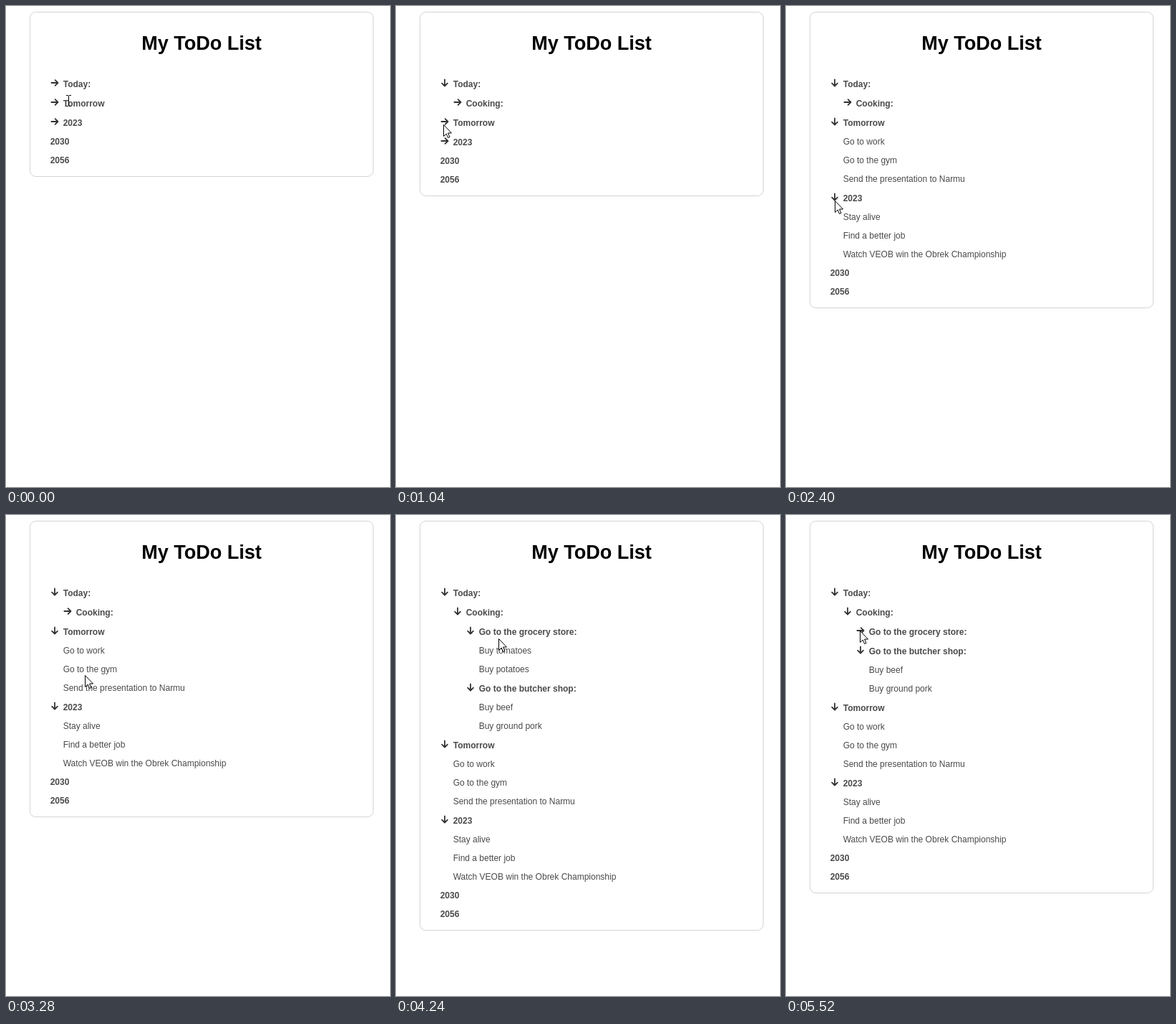
Write an HTML page that moves like this. It is 536 px wide and 670 px high and loops after 5.68 s.

```html
<!DOCTYPE html>
<html lang="en">
<head>
<meta charset="utf-8">
<title>My ToDo List</title>
<style>
  html, body { margin: 0; width: 100%; height: 100%; overflow: hidden; background: #fff; }
  svg { display: block; width: 536px; height: 670px; font-family: Arial, "Liberation Sans", sans-serif; }
  .title { font-size: 27px; font-weight: bold; text-anchor: middle; }
  .row { font-size: 12px; fill: #4a4a4a; }
  .bold { font-weight: bold; }
  .arrow { fill: none; stroke: #333; stroke-width: 1.8; stroke-linecap: round; stroke-linejoin: round; }
</style>
</head>
<body>
<svg id="stage" viewBox="0 0 536 670">
  <rect id="card" x="33.5" y="8.5" width="479" rx="8" fill="#fff" stroke="#d3d3d3"/>
  <text class="title" x="273" y="61">My ToDo List</text>
  <g id="list"></g>
  <path id="beam" d="M84 124.5h3m1 0h3M87.5 125v14M84 139.5h3m1 0h3" fill="none" stroke="#000"/>
  <path id="pointer" d="M.5 .5V16.5L4.2 13L6.6 18.5L9 17.5L6.6 12H11.5Z" fill="#fff" stroke="#000"/>
</svg>
<script>
const LOOP = 5680, TICK = 80;
const LEFT = 61.7, INDENT = 18, TOP = 86;

// A folder has open and close times; its kids are nested rows.
const folder = (text, open, kids, close = LOOP) => ({ text, open, close, kids, bold: true });
const leaf = (text, bold = false) => ({ text, bold });
const leaves = (...texts) => texts.map(text => leaf(text));

const tree = [
  folder("Today:", 480, [
    folder("Cooking:", 3760, [
      folder("Go to the grocery store:", 0, leaves("Buy tomatoes", "Buy potatoes"), 5520),
      folder("Go to the butcher shop:", 0, leaves("Buy beef", "Buy ground pork"))
    ])
  ]),
  folder("Tomorrow", 1200, leaves("Go to work", "Go to the gym", "Send the presentation to Narmu")),
  folder("2023", 2400, leaves("Stay alive", "Find a better job", "Watch VEOB win the Obrek Championship")),
  leaf("2030", true),
  leaf("2056", true)
];

// Each move is one curve from the previous resting place, pulled towards "via".
const restAt = { x: 87, y: 126 };
const move = (start, end, via, to) => ({ start, end, via, to });
const point = (x, y) => ({ x, y });
const moves = [
  move(80, 400, point(74, 112), point(67, 108)),
  move(480, 1040, point(142, 100), point(66, 165)),
  move(1360, 2160, point(108, 288), point(68, 271)),
  move(2640, 3600, point(140, 300), point(90, 134)),
  move(3840, 4320, point(240, 185), point(106, 168)),
  move(5040, 5360, point(232, 176), point(103, 161))
];

const $ = id => document.getElementById(id);

function make(tag, attrs, parent) {
  const el = document.createElementNS("http://www.w3.org/2000/svg", tag);
  for (const key in attrs) el.setAttribute(key, attrs[key]);
  return parent.appendChild(el);
}

const show = (el, on) => el.setAttribute("display", on ? "inline" : "none");
const place = (el, x, y, turn = 0) => el.setAttribute("transform", `translate(${x} ${y}) rotate(${turn})`);

function build(items, x) {
  for (const item of items) {
    item.group = make("g", {}, $("list"));
    if (item.kids) {
      item.arrow = make("path", { class: "arrow", d: "M-4.6 0H4.4M.6-3.9L4.5 0L.6 3.9" }, item.group);
      item.arrowX = x + 6.3;
    }
    const label = make("text", {
      class: item.bold ? "row bold" : "row",
      x: item.kids ? x + INDENT : x
    }, item.group);
    label.textContent = item.text;
    if (item.kids) build(item.kids, x + INDENT);
  }
}

// Stacks the visible rows below y and returns the last baseline.
function layout(items, t, shown, y) {
  for (const item of items) {
    show(item.group, shown);
    if (shown) y += item.kids ? 27 : 26;
    place(item.group, 0, y);
    if (item.kids) {
      const isOpen = t >= item.open && t < item.close;
      place(item.arrow, item.arrowX, -6, isOpen ? 90 : 0);
      y = layout(item.kids, t, shown && isOpen, y);
    }
  }
  return y;
}

function pointerAt(t) {
  let pos = restAt;
  for (const { start, end, via, to } of moves) {
    if (t < start) break;
    const k = Math.min(1, (t - start) / (end - start));
    const curve = axis => Math.round(
      (1 - k) ** 2 * pos[axis] + 2 * k * (1 - k) * via[axis] + k * k * to[axis]);
    pos = point(curve("x"), curve("y"));
  }
  return pos;
}

function render(ms) {
  const t = Math.floor((ms % LOOP) / TICK) * TICK;
  const lastBaseline = layout(tree, t, true, TOP);
  $("card").setAttribute("height", lastBaseline + 10);

  const overText = t < 160;
  const { x, y } = pointerAt(t);
  show($("beam"), overText);
  show($("pointer"), !overText);
  place($("pointer"), x, y);
}

build(tree, LEFT);
const start = performance.now();
function loop() {
  render(performance.now() - start);
  requestAnimationFrame(loop);
}
loop();
</script>
</body>
</html>
```
